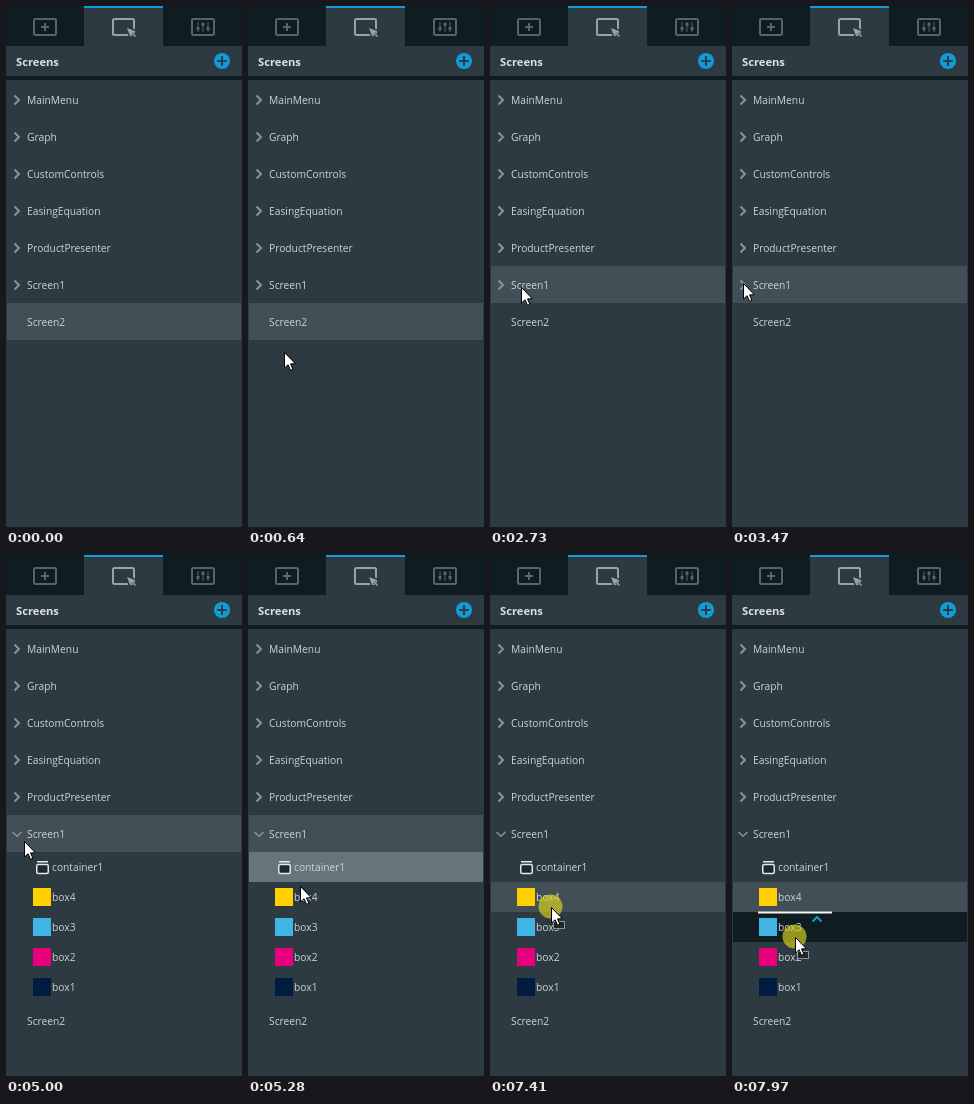
Recreate the animation shown at these times as an HTML page with a canvas. Size 236x521 px, loop 8 s.

```html
<!DOCTYPE html>
<html lang="en">
<head>
<meta charset="utf-8">
<title>Screens panel</title>
<style>
  html, body { margin: 0; width: 100%; height: 100%; overflow: hidden; background: #2d3a41; }
  canvas { display: block; }
</style>
</head>
<body>
<canvas id="stage" width="236" height="521"></canvas>
<script>
const ctx = document.getElementById('stage').getContext('2d');
const LOOP = 8000;
const FONT = '"Open Sans", "Noto Sans", sans-serif';
const C = {
  panel: '#2d3a41', dark: '#0f1d23', selected: '#434f56', hover: '#66747b',
  text: '#ccd3d6', chevron: '#87949a', dim: '#56646b', blue: '#0d9ddb'
};

const SCREENS = ['MainMenu', 'Graph', 'CustomControls', 'EasingEquation', 'ProductPresenter', 'Screen1', 'Screen2'];
const CHILDREN = [
  ['container1', null], ['box4', '#ffd000'], ['box3', '#41b4e6'],
  ['box2', '#e6007e'], ['box1', '#001c40']
];
const TOP = 75, ROW = 37, CHILD = 30;

// Pointer moves: start, end, target x, target y, ease-out power
const MOVES = [
  [10, 840, 37, 317, 1.4],
  [850, 1400, 41, 282, 2],
  [2690, 2960, 6, 277, 2],
  [3230, 3470, 11, 277, 1.5],
  [4960, 5510, 61, 342, 2],
  [7215, 8000, 63, 384, 1]
];
// Times the mouse button is held
const PRESSES = [[1760, 1890], [3750, 3880], [5740, 5920], [7030, LOOP]];
const SELECT_SCREEN1 = 1860, EXPAND = 3880, SELECT_BOX4 = 5840, DRAG = 7260;

function pointer(t) {
  let x = 32, y = 530;
  for (const [start, end, tx, ty, power] of MOVES) {
    if (t <= start) break;
    const p = 1 - Math.pow(1 - Math.min(1, (t - start) / (end - start)), power);
    x += (tx - x) * p;
    y += (ty - y) * p;
  }
  return { x: Math.round(x), y: Math.round(y) };
}

function rect(x, y, w, h, color) {
  ctx.fillStyle = color;
  ctx.fillRect(x, y, w, h);
}

function line(points, color, width) {
  ctx.beginPath();
  points.forEach(([x, y]) => ctx.lineTo(x, y));
  ctx.strokeStyle = color;
  ctx.lineWidth = width;
  ctx.stroke();
}

function disc(x, y, r, color) {
  ctx.beginPath();
  ctx.arc(x, y, r, 0, Math.PI * 2);
  ctx.fillStyle = color;
  ctx.fill();
}

function frame(x, y, w, h, r, color, width) {
  ctx.beginPath();
  ctx.roundRect(x, y, w, h, r);
  ctx.strokeStyle = color;
  ctx.lineWidth = width;
  ctx.stroke();
}

function shape(x, y, points, fill, stroke) {
  ctx.beginPath();
  points.forEach(([px, py]) => ctx.lineTo(x + px, y + py));
  ctx.closePath();
  ctx.fillStyle = fill;
  ctx.fill();
  if (stroke) {
    ctx.strokeStyle = stroke;
    ctx.lineWidth = 1;
    ctx.stroke();
  }
}

function text(str, x, y, size = 10.25, weight = 400, color = C.text) {
  ctx.font = `${weight} ${size}px ${FONT}`;
  ctx.fillStyle = color;
  ctx.fillText(str, x, y);
}

function plus(x, y, arm, color) {
  rect(x - arm, y - 1, arm * 2, 2, color);
  rect(x - 1, y - arm, 2, arm * 2, color);
}

function header() {
  rect(0, 0, 236, 40, C.dark);
  rect(78, 0, 79, 40, C.panel);
  rect(78, 0, 79, 2, C.blue);

  frame(28, 13, 22, 16, 1.5, C.dim, 2);
  plus(39, 21, 4, C.dim);

  const light = '#98a4a8';
  frame(107, 13, 21, 16, 1.5, light, 2);
  shape(120, 21, [[-1, -1], [11, 3], [7, 5], [11, 9], [9, 11], [5, 7], [3, 11]], C.panel);
  shape(121, 22, [[0, 0], [8.5, 3.2], [5.6, 4.6], [9, 8], [8, 9], [4.6, 5.6], [3.2, 8.5]], light);

  frame(186, 13, 22, 16, 1.5, C.dim, 2);
  [[192, 22], [197, 18], [202, 22]].forEach(([x, y]) => {
    rect(x - 0.5, 16, 1, 10, C.dim);
    rect(x - 1.5, y - 1, 3, 3, C.dim);
  });

  text('Screens', 10, 60, 11.2, 700, '#dce2e4');
  disc(216, 55, 8, C.blue);
  plus(216, 55, 5, C.panel);
  rect(0, 70, 236, 4, C.dark);
}

function chevron(cy, open, color) {
  const points = open
    ? [[6.5, cy - 2], [11, cy + 2.2], [15.5, cy - 2]]
    : [[8.5, cy - 4.5], [13, cy], [8.5, cy + 4.5]];
  line(points, color, open ? 1.5 : 2);
}

function containerIcon(y) {
  rect(31, y - 6, 11, 1.5, '#e4e8ea');
  rect(31, y - 2, 11, 8, '#1d2930');
  frame(30.75, y - 2.5, 11.5, 9, 1.5, '#e4e8ea', 1.5);
}

function layout(open) {
  const rows = [];
  let y = TOP;
  for (const name of SCREENS) {
    rows.push({ name, y, h: ROW, parent: name !== 'Screen2' });
    y += ROW;
    if (name === 'Screen1' && open) {
      for (const [child, color] of CHILDREN) {
        rows.push({ name: child, y, h: CHILD, child: true, color });
        y += CHILD;
      }
    }
  }
  return rows;
}

function drawRow(row, state, open) {
  const { name, y, h } = row;
  const cy = y + Math.floor(h / 2);
  if (state) rect(1, y, 234, h, C[state]);
  if (row.child) {
    if (row.color) rect(27, cy - 9, 18, 18, row.color);
    else containerIcon(cy);
    text(name, 46, cy + 4);
    return;
  }
  if (row.parent) {
    const isOpen = open && name === 'Screen1';
    chevron(cy + 1, isOpen, state === 'hover' ? '#6f7c82' : C.chevron);
  }
  text(name, 21, cy + 5);
}

function dropMark(y) {
  rect(26, y - 0.5, 74, 2, '#f4f6f7');
  line([[80.5, y + 9.5], [85, y + 5], [89.5, y + 9.5]], C.blue, 2);
}

function drawPointer({ x, y }, dragging) {
  const arrow = [[0, 0], [0, 15.5], [3.6, 12.2], [6, 17.8], [8.4, 16.8], [6, 11.4], [10.8, 11.2]];
  if (dragging) {
    ctx.setLineDash([1, 1]);
    rect(x + 3, y + 15, 10, 7, '#20282c');
    ctx.strokeStyle = '#f4f4f4';
    ctx.lineWidth = 1;
    ctx.strokeRect(x + 2.5, y + 14.5, 11, 7);
    ctx.setLineDash([]);
  }
  shape(x + 0.5, y + 0.5, arrow, '#fff', '#000');
}

function draw(t) {
  const open = t >= EXPAND;
  const dragging = t >= DRAG;
  const selected = t >= SELECT_BOX4 ? 'box4' : t >= SELECT_SCREEN1 ? 'Screen1' : 'Screen2';
  const tip = pointer(t);
  const lagged = pointer(t - 45).y; // row highlight trails the pointer

  rect(0, 0, 236, 521, C.panel);
  header();

  let target = null;
  for (const row of layout(open)) {
    const over = lagged >= row.y && lagged < row.y + row.h;
    let state = '';
    if (row.name === selected) state = 'selected';
    else if (over) state = dragging ? 'dark' : 'hover';
    if (state === 'dark') target = row;
    drawRow(row, state, open);
  }
  if (target) dropMark(target.y);

  if (t < 50) return;
  if (PRESSES.some(([from, to]) => t >= from && t < to)) {
    disc(tip.x - 0.5, tip.y - 0.5, 12, 'rgba(217, 210, 28, 0.67)');
  }
  drawPointer(tip, dragging);
}

const began = performance.now();
function tick() {
  draw((performance.now() - began) % LOOP);
  requestAnimationFrame(tick);
}
tick();
</script>
</body>
</html>
```
